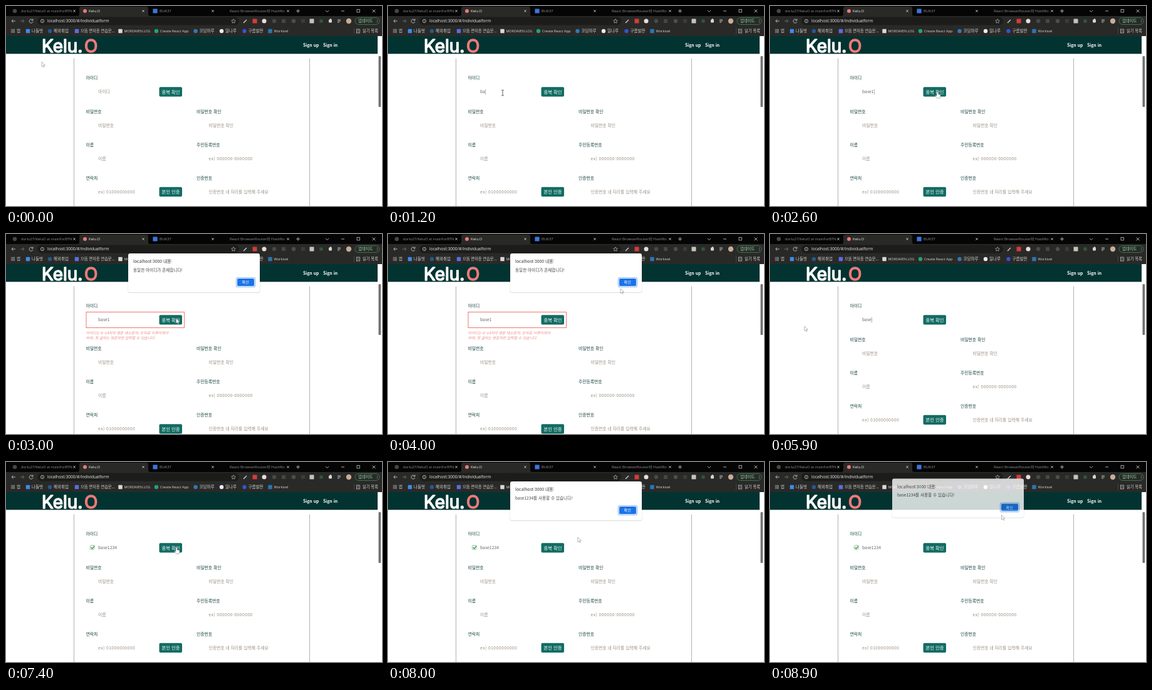
These frames come from a looping animation (600 px wide and 319 px high, 9000 ms). An HTML page:

```html
<!DOCTYPE html>
<html lang="ko">
<head>
<meta charset="utf-8">
<title>Sign-up form</title>
<style>
html, body { margin: 0; width: 100%; height: 100%; overflow: hidden; background: #fff; }
svg { display: block; width: 100vw; height: 100vh; }
text { font-family: "Open Sans", "Noto Sans CJK KR", "Noto Sans CJK", sans-serif; white-space: pre; }
.page text { font-family: "Noto Sans CJK KR", "Noto Sans CJK", "Noto Sans", sans-serif; }
.page .logo { font-family: Inter, sans-serif; font-weight: 400; stroke-width: 1.5; stroke-linejoin: round; }
</style>
</head>
<body>
<svg id="stage" viewBox="0 0 600 319"></svg>
<script>
const LOOP = 9000, STEP = 100, SHIFT = 14.5, TEXT_X = 147;
const stage = document.getElementById('stage');

function el(parent, tag, attrs = {}, content) {
  const node = document.createElementNS('http://www.w3.org/2000/svg', tag);
  for (const key in attrs) node.setAttribute(key, attrs[key]);
  if (content !== undefined) node.textContent = content;
  parent.append(node);
  return node;
}
const group = (parent, attrs) => el(parent, 'g', attrs);
const rect = (p, x, y, width, height, fill, more) => el(p, 'rect', { x, y, width, height, fill, ...more });
const square = (p, cx, cy, r, fill) => rect(p, cx - r, cy - r, 2 * r, 2 * r, fill, { rx: .6 });
const dot = (p, cx, cy, r, fill, more) => el(p, 'circle', { cx, cy, r, fill, ...more });
const line = (p, d, stroke, width = .8, more) =>
  el(p, 'path', { d, stroke, fill: 'none', 'stroke-width': width, ...more });
// y is the optical middle of the line
const label = (p, x, y, str, size, fill, more) =>
  el(p, 'text', { x, y: y + size * .36, 'font-size': size, fill, ...more }, str);
const show = (node, on) => node.setAttribute('visibility', on ? 'visible' : 'hidden');

function drawBrowser() {
  const g = group(stage), pale = '#d6d6d4', grey = '#8f908f', bar = '#292a28';
  rect(g, 0, 0, 600, 17, '#050505');
  rect(g, 0, 16, 600, 32, bar);
  el(g, 'path', { d: 'M114 16Q117 16 117 13V4Q117 1 120 1H224Q227 1 227 4V13Q227 16 230 16Z', fill: bar });

  dot(g, 14, 8, 3.3, '#454745');
  label(g, 24, 8, 'dorlu27/KeluO at mainForBTN', 5.8, grey);
  dot(g, 126, 8, 3, '#ef7777');
  label(g, 132, 8, 'Kelu.O', 6, '#efeee0');
  square(g, 238, 8, 3.6, '#3c76dc');
  label(g, 245, 8, 'BUK37', 6, grey);
  label(g, 357, 8, 'React BrowserRouter와 HashRo', 6, grey);
  const cross = (x, r, color) => line(g, `M${x - r} ${8 - r}l${2 * r} ${2 * r}m0 ${-2 * r}l${-2 * r} ${2 * r}`, color);
  for (const x of [109, 219, 330, 450]) cross(x, 1.7, pale);
  line(g, 'M463 8h6M466 5v6', pale);
  line(g, 'M510 7l2.5 2.5L515 7M535 8h5', pale);
  rect(g, 560, 5.5, 4.5, 4.5, 'none', { stroke: pale, 'stroke-width': .7 });
  cross(587, 2.4, pale);

  line(g, 'M15 24H9m2.5 -2.5L9 24l2.5 2.5', pale);
  line(g, 'M23 24h6m-2.5 -2.5L29 24l-2.5 2.5', '#777a7e');
  line(g, 'M42.5 22.3A3 3 0 1 0 43 25M43 20.5v2.5h-2.5', pale);
  rect(g, 50, 17.5, 322, 13, '#1c1d1b', { rx: 6.5 });
  dot(g, 58, 24, 2.7, 'none', { stroke: pale, 'stroke-width': .7 });
  line(g, 'M58 23.5v2M58 22v.7', pale, .7);
  label(g, 66, 24, 'localhost:3000/#/individualform', 6.6, '#ececea');
  el(g, 'path', { d: 'M363 20.7l1 2.2 2.4.3 -1.8 1.6.5 2.4 -2.1-1.2 -2.1 1.2.5-2.4 -1.8-1.6 2.4-.3z',
    fill: 'none', stroke: pale, 'stroke-width': .6 });

  line(g, 'M379 27l5 -5', pale, 1.3);
  square(g, 397, 24, 3.5, '#d63b38');
  dot(g, 412, 24, 3.5, '#eadcda');
  dot(g, 428, 24, 3.2, '#484a48');
  square(g, 443, 24, 3, '#454745');
  dot(g, 459, 24, 3.2, '#4c4e4c');
  square(g, 474, 24, 3, '#3a3c3a');
  square(g, 488, 24, 3.5, '#c3c3c0');
  square(g, 503, 24, 2.6, '#2f5a38');
  rect(g, 515, 21.5, 5, 5, pale, { rx: 1 });
  dot(g, 518, 21.5, 1.3, pale);
  line(g, 'M529 22h5M529 24h5M529 26h3', pale);
  dot(g, 547, 24, 4.2, '#c9ad98');
  rect(g, 557, 18.5, 39, 11, '#262c27', { rx: 5.5, stroke: '#4f8a63', 'stroke-width': .7 });
  label(g, 562, 24, '업데이트', 6.3, '#9ad6ad');
  for (const y of [22, 24, 26]) dot(g, 592.5, y, .5, '#9ad6ad');

  for (let i = 0; i < 9; i++)
    rect(g, 8 + i % 3 * 2.2, 36.8 + Math.floor(i / 3) * 2.2, 1.5, 1.5, ['#e66a60', '#71a7ef', '#7bc58a'][i % 3]);
  label(g, 17, 40, '앱', 6.5, pale);
  const bookmarks = [
    [35, '나들벗', '#3b8be8', 6.5, square], [70, '해외취업', '#24598f', 6.5, dot],
    [113, '으뜸 면허증 연습문...', '#5a6ee0', 6.3, square], [182.5, 'MORDAVEN.LOG', '#d9dad8', 5.4, square],
    [240, 'Create React App', '#21a37c', 5.7, dot], [302.5, '코담마루', '#3179b5', 6.5, dot],
    [344, '일나루', '#e6eefb', 6.5, dot], [380.5, '구름발판', '#3453d4', 6.5, dot],
    [421.5, 'Workivel', '#2977b5', 5.7, square]
  ];
  for (const [x, name, color, size, icon] of bookmarks) {
    icon(g, x, 40, 3.2, color);
    label(g, x + 6, 40, name, size, pale);
  }
  line(g, 'M555.5 35v10', '#555653', .6);
  rect(g, 559.5, 37, 5, 6, 'none', { stroke: pale, 'stroke-width': .7 });
  line(g, 'M561 39h2M561 41h2', pale, .6);
  label(g, 569, 40, '읽기 목록', 6.3, pale);
}

const DARK = '#123f3c', HINT = '#9b8f82', TEAL = '#126c63';
const page = group(stage, { class: 'page' });

function button(parent, y, str) {
  rect(parent, 244.5, y - 7.7, 36.5, 15.2, TEAL, { rx: 2 });
  label(parent, 248.5, y, str, 7.3, '#fff', { 'font-weight': 500 });
}
const title = (p, x, y, str) => label(p, x, y, str, 6.8, DARK, { 'font-weight': 500 });
const hint = (p, x, y, str, spacing = 0) =>
  label(p, x, y, str, 6.8, HINT, { 'font-weight': 300, 'letter-spacing': spacing });

rect(page, 0, 48, 600, 271, '#fff');
rect(page, 0, 48, 593, 28.3, '#023331');
el(page, 'text', { x: 57, y: 74, 'font-size': 28, fill: '#fff', stroke: '#fff', class: 'logo' }, 'Kelu.');
el(page, 'text', { x: 125, y: 74, 'font-size': 28, fill: '#f27979', stroke: '#f27979', class: 'logo' }, 'O');
label(page, 474, 62.5, 'Sign up', 6.8, '#fff', { 'font-weight': 700 });
label(page, 506, 62.5, 'Sign in', 6.8, '#fff', { 'font-weight': 700 });
rect(page, 594.5, 80, 3.7, 81, '#707070', { rx: 1 });
line(page, 'M108.5 83.5V319M484.5 83.5V319', '#b2b2b2', 1);

title(page, 127.5, 115, '아이디');
const selection = rect(page, TEXT_X, 132.5, 0, 9, '#3390ff');
const idHint = hint(page, TEXT_X, 137, '아이디');
const idText = label(page, TEXT_X, 137, '', 6.8, '#666');
const caret = rect(page, TEXT_X, 132.5, .5, 9, '#666');
button(page, 137, '중복 확인');

const check = group(page);
rect(check, 134.2, 132.8, 7, 7, '#eef7ef', { rx: 2.5, stroke: '#9aaba0', 'stroke-width': .8 });
line(check, 'M135.7 136.2l1.8 2 3.8 -4.6', '#2da34d', 1.3);

const error = group(page);
rect(error, 128, 124.5, 156.5, 25, 'none', { stroke: '#ee7770', 'stroke-width': 1 });
const errorLook = { 'font-style': 'italic', 'font-weight': 300 };
label(error, 127.5, 158, '아이디는 6~14자의 영문 대소문자, 숫자로 이루어져야', 5.9, '#e98784', errorLook);
label(error, 127.5, 165.5, '하며, 첫 글자는 영문자만 입력할 수 있습니다.', 5.9, '#e98784', errorLook);

const rest = group(page);
const fields = [
  [0, 168.5, '비밀번호', '비밀번호'], [176.5, 168.5, '비밀번호 확인', '비밀번호 확인'],
  [0, 221.5, '이름', '이름'], [176.5, 221.5, '주민등록번호', 'ex) 000000-0000000', .42],
  [0, 274.5, '연락처', 'ex) 01000000000', .42], [176.5, 274.5, '인증번호', '인증번호 네 자리를 입력해 주세요']
];
for (const [dx, y, name, sample, spacing] of fields) {
  title(rest, 127.5 + dx, y, name);
  hint(rest, TEXT_X + dx, y + 22, sample, spacing);
}
button(rest, 296.5, '본인 인증');

drawBrowser();

const dialog = group(stage, { class: 'page' });
rect(dialog, 194.6, 31, 210.8, 63, '#000', { rx: 3, opacity: .14 });
rect(dialog, 195, 31, 210, 62, '#fff', { rx: 3 });
label(dialog, 203, 44, 'localhost:3000 내용:', 6.8, '#333');
const message = label(dialog, 203, 57.5, '', 6.6, '#444');
rect(dialog, 367.5, 69.5, 30, 15, '#fff', { rx: 2.5, stroke: '#8ab8f5', 'stroke-width': 1.2 });
rect(dialog, 369, 71, 27, 12, '#1a73e8', { rx: 1.8 });
label(dialog, 376.5, 77, '확인', 6.2, '#fff', { 'font-weight': 500 });

const pointer = group(stage, { fill: '#fff', stroke: '#888', 'stroke-width': .6, 'stroke-linejoin': 'round' });
const shapes = {
  arrow: el(pointer, 'path', { d: 'M0 0V7.6L1.8 5.9 3 8.6 4.2 8.1 3 5.5H5.5Z' }),
  beam: el(pointer, 'path', { d: 'M-2 -4.5Q0 -4.5 0 -3.5Q0 -4.5 2 -4.5M0 -3.5V3.5M-2 4.5Q0 4.5 0 3.5Q0 4.5 2 4.5',
    fill: 'none', stroke: '#544a42', 'stroke-width': .9 }),
  hand: el(pointer, 'path', { d: 'M-1 0Q0 -1 1 0V3.5L4.5 4.5Q5.3 5 5 7L4 10H-.5L-3.3 6.5Q-3 5 -1 6.5Z' })
};

// [time, x, y]
const path = [
  [0, 57, 89], [400, 128, 140], [700, 183, 138.5], [1800, 183, 138.5], [2500, 267, 137], [2900, 267, 137],
  [3700, 371, 87], [4200, 371, 87], [4700, 183, 138], [4800, 183, 138], [5300, 55, 147], [6500, 55, 147],
  [7200, 272, 136.5], [7700, 272, 136.5], [8500, 369.5, 84.5], [LOOP, 369.5, 84.5]
];
// [time, value of the id field]
const typing = [[0, ''], [900, '']];
const type = (start, gap, word) => [...word].forEach((_, i) => typing.push([start + i * gap, word.slice(0, i + 1)]));
type(1100, 100, 'base1');
typing.push([4800, 'base1']);
type(5600, 100, 'base1234');

const alerts = [
  [2800, 4200, '동일한 아이디가 존재합니다!'],
  [7600, 8900, 'base1234를 사용할 수 있습니다!']
];
const between = (t, a, b) => t >= a && t < b;

function pointerAt(t) {
  const i = Math.max(1, path.findIndex(p => p[0] > t));
  const [t0, x0, y0] = path[i - 1], [t1, x1, y1] = path[i];
  const k = (t - t0) / (t1 - t0), ease = k * k * (3 - 2 * k);
  return [x0 + (x1 - x0) * ease, y0 + (y1 - y0) * ease];
}

function render(t) {
  const [x, y] = pointerAt(t);
  const [typedAt, value] = typing.filter(s => s[0] <= t).pop();
  const alert = alerts.find(a => between(t, a[0], a[1] + STEP));
  const focused = between(t, 900, 2700) || between(t, 4800, 7300);
  const failed = between(t, 2700, 4800);
  const selecting = between(t, 4800, 5600);

  idText.textContent = value;
  show(idHint, !value);
  const end = TEXT_X + (value ? idText.getComputedTextLength() : 0);
  const from = Math.max(TEXT_X, Math.min(end, x));
  selection.setAttribute('x', from);
  selection.setAttribute('width', selecting ? end - from : 0);
  idText.setAttribute('fill', selecting && from === TEXT_X ? '#fff' : '#666');
  caret.setAttribute('x', end + .3);
  show(caret, focused && !selecting && (t - typedAt) % 1000 < 500);
  show(error, failed);
  show(check, t >= 7300);
  rest.setAttribute('transform', `translate(0 ${failed ? SHIFT : 0})`);

  show(dialog, alert);
  if (alert) {
    const fading = t === alert[0] || t === alert[1];
    message.textContent = alert[2];
    dialog.setAttribute('opacity', fading ? .8 : 1);
    dialog.setAttribute('transform', `translate(0 ${fading ? -4.5 : 0})`);
  }

  const inRow = !alert && between(y, 124, 150);
  const overButton = inRow && between(x, 245, 281);
  const shape = overButton ? 'hand' : inRow && between(x, 140, 243) ? 'beam' : 'arrow';
  for (const name in shapes) show(shapes[name], name === shape);
  pointer.setAttribute('transform', `translate(${x} ${y})`);
}

const start = performance.now();
function tick() {
  const t = (performance.now() - start) % LOOP;
  render(Math.floor(t / STEP) * STEP);
  requestAnimationFrame(tick);
}
tick();
</script>
</body>
</html>
```
